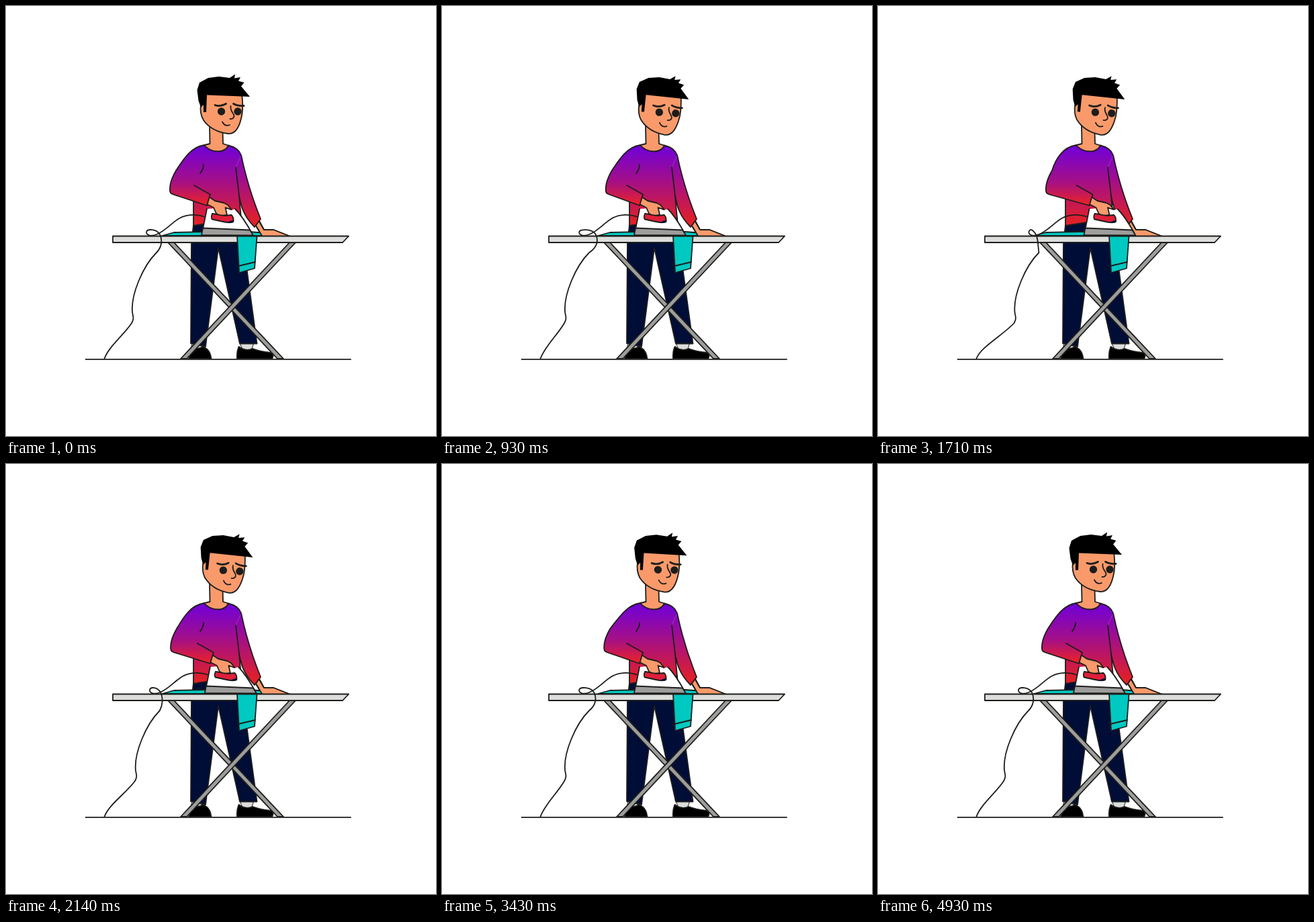
An HTML page for the animation above (5710 ms loop, 640x640 px).

```html
<!DOCTYPE html>
<html lang="en">
<head>
<meta charset="utf-8">
<title>Ironing</title>
<style>
  html, body { margin: 0; width: 100%; height: 100%; overflow: hidden; background: #fff; }
  svg { display: block; width: 100%; height: 100%; }
  .line { fill: none; }
  .skin { fill: #fa9a6b; }
  .navy { fill: #000d37; }
  .teal { fill: #00c9c1; }
  .grey { fill: #9d9d9c; }
  .pale { fill: #dcdedc; }
  .knit { fill: url(#knit); }
  .bare { stroke: none; }
</style>
</head>
<body>
<svg viewBox="0 0 640 640" stroke="#1d1d1b" stroke-width="1.8" stroke-linejoin="round" stroke-linecap="round">
  <defs>
    <linearGradient id="knit" gradientUnits="userSpaceOnUse" x1="0" y1="207" x2="0" y2="320">
      <stop stop-color="#6e00dc"/><stop offset="1" stop-color="#e0202a"/>
    </linearGradient>
    <linearGradient id="cuff" gradientUnits="userSpaceOnUse" x1="0" y1="207" x2="0" y2="296">
      <stop stop-color="#6e00dc"/><stop offset=".618" stop-color="#a61085"/><stop offset="1" stop-color="#ea2226"/>
    </linearGradient>
  </defs>

  <!-- feet and trousers -->
  <path class="line" d="M118.5 525.8H513"/>
  <path class="pale" d="M277 502L275 511L290 511L292 504ZM347 500L353 513L365 513L369 501Z" stroke-width="1"/>
  <path fill="#000" d="M272 525Q275 510 282 509Q287 511 293 507Q304 511 305.500 525ZM344 525Q343 515 346.500 507Q357 515 367 510Q377 514 394 516Q400 518 396 525Z"/>
  <path class="navy" d="M279 326L276 352L275 502L297 507L316 360L348 502.500L373.500 502.500L353 352L350 315Z"/>

  <!-- jumper -->
  <path class="knit bare" d="M295 207Q302 216 316 216.500Q327 216 331 207.500Q346 211 350 222L342 240L350 316L336 319L279 327V285L262 250Q275 215 295 207Z"/>
  <path class="line" d="M279 288V327L350 316L347 283M294 236Q294 243 289 249"/>
  <path class="skin" d="M372 327L376 318L384 333Q391 333 398 333L422 342.500H381Z"/>
  <path class="knit bare" d="M342 240L350 222C354 241 364 280 379 317L370 329C353 312 350 298 347 283Z"/>
  <path class="line" d="M331 207.500Q346 211 350 222C354 241 364 280 379 317L370 329C353 312 350 298 347 283L342 240"/>

  <!-- neck and head -->
  <path class="skin" d="M303 178L303.500 205L295 207Q302 216 316 216.500Q327 216 331 207.500L323 205L322.500 185Z"/>
  <g id="head">
    <path class="skin" d="M292 130L290 146Q288 160 294 170Q306 187 331 190C344 191 349 175 351.500 160Q353 148 351 130Z"/>
    <path fill="#000" stroke="none" d="M284.500 125L288 114L301 107L317 105L333 107L341 101.500L340 107.500L349 106L346 111.500L354.500 114L350 119.500L363 135L299 132.500L298 158H294V147L290 151L286.500 141Z"/>
    <path class="line" stroke-width="2.800" d="M311 147.500Q319 150.500 327.500 145.500M338.500 145.500Q345 149 354 148.500"/>
    <path class="line" d="M334.500 149C333 157 340 160 339.500 164Q338.500 168.500 333.500 168M322 172.500Q326 180 333 177"/>
    <g id="eyes" fill="#1d1d1b" stroke="none"><circle cx="320.500" cy="157" r="5.700"/><circle cx="345" cy="157" r="5.700"/></g>
  </g>

  <!-- table -->
  <path class="teal" d="M232 342L250 337L300 336H362L382 337.500L386 342Z"/>
  <path class="skin" d="M377 334L383 333Q391 333 398 333L422 342.500H381Z" stroke="none"/>
  <path class="line" d="M377 321L384 333Q391 333 398 333L422 342.500M373 329L381 342"/>
  <path class="grey" d="M241 352H250L413 525H404Z"/>
  <path class="grey" d="M431 352H422L260 525H269Z"/>
  <path class="pale" d="M159 342.500H510L501 352H159Z"/>
  <path class="teal" d="M344 342.500H373.500L370 390.500L347 397Z"/>
  <path class="line" d="M346 387L371 381"/>

  <!-- iron, hand and sleeve -->
  <g id="iron">
    <path fill="#fff" stroke="none" d="M299 302L293 332L364 335Q352 313 341 302L335 304L326 300Z"/>
    <path class="line" d="M299 302L293 332M341 302Q352 313 366 338"/>
    <path class="grey" d="M293 330.500L363 333.500L368 341.500L291 341Z"/>
    <path fill="#e01f3a" d="M307 309Q304.500 315 307 317.500L323 321Q335 323.500 338.500 321Q339 314 335.500 311L327 312Z"/>
    <path class="navy bare" d="M330 321.500L338 318.500V322Q335 323.500 330 321.500Z"/>
    <path class="skin" d="M302 284L311 290L324 293L330 296L335.500 303L326.500 300L329 311Q319 313 313 309L309 300L299 295Z"/>
  </g>
  <path id="sleeve" fill="url(#cuff)" stroke="none"/>
  <path id="seam" class="line"/>
  <path id="cord" class="line"/>
</svg>
<script>
const LOOP = 5.71, FPS = 14;
const $ = id => document.getElementById(id);
const set = (id, name, value) => $(id).setAttribute(name, value);

// Eased value at time t between [time, value] keys
function track(t, keys) {
  const i = keys.findIndex(key => key[0] > t);
  if (i < 0) return keys[keys.length - 1][1];
  if (!i) return keys[0][1];
  const [t0, a] = keys[i - 1], [t1, b] = keys[i];
  const u = (t - t0) / (t1 - t0);
  return a + (b - a) * u * u * (3 - 2 * u);
}

const slide = [[0, 0], [.72, -7.5], [1.72, 15.5], [2.74, -13], [3.93, 0]];
const elbow = [[0, 0], [.72, -1], [1.72, 6], [2.74, -7], [3.93, 0]];
const tilt = [[0, 0], [.9, 3.9], [2.6, 3.9], [3.93, 0]];
const blink = [[4.5, 1], [4.714, .1], [4.928, 1]];

function draw(t) {
  const d = track(t, slide), e = track(t, elbow), s = track(t, blink);
  set('iron', 'transform', `translate(${d})`);
  set('head', 'transform', `rotate(${track(t, tilt)} 305 200)`);
  set('eyes', 'transform', `translate(0 ${157 * (1 - s)}) scale(1 ${s})`);

  const arm = `M295 207C275 210 264 228 ${253 + e} 245Q${243 + e} 262 ${244 + e} 275`
    + `Q${244 + e} 279 ${249 + e} 280.5L${299 + d} 297L${304 + d} 280.5L${280 + d} 267`;
  set('sleeve', 'd', arm + 'Z');
  set('seam', 'd', arm);

  set('cord', 'd', `M${295 + d} 313.5C${286 + d} 310 ${270 + d} 309 ${258 + d} 316`
    + `C${246 + d} 323 ${237 + d} 335 ${224 + d} 340C${214 + d} 344 ${209 + d} 340 ${209 + d} 336.5`
    + `C${210 + d} 331 ${224 + e} 332 ${229 + e} 340C${233 + e} 348 ${232 + e} 359 ${224 + d} 367`
    + `C${203 + d} 388 ${186 + d} 430 ${188 + d} 455C${188.5 + d} 462 ${191.5 + d} 464 ${187 + d} 472`
    + `C${175 + d * .7} 490 152 508 146.500 525`);
}

function tick() {
  const t = performance.now() / 1000 % LOOP;
  draw(Math.floor(t * FPS + .05) / FPS);
  requestAnimationFrame(tick);
}
tick();
</script>
</body>
</html>
```
